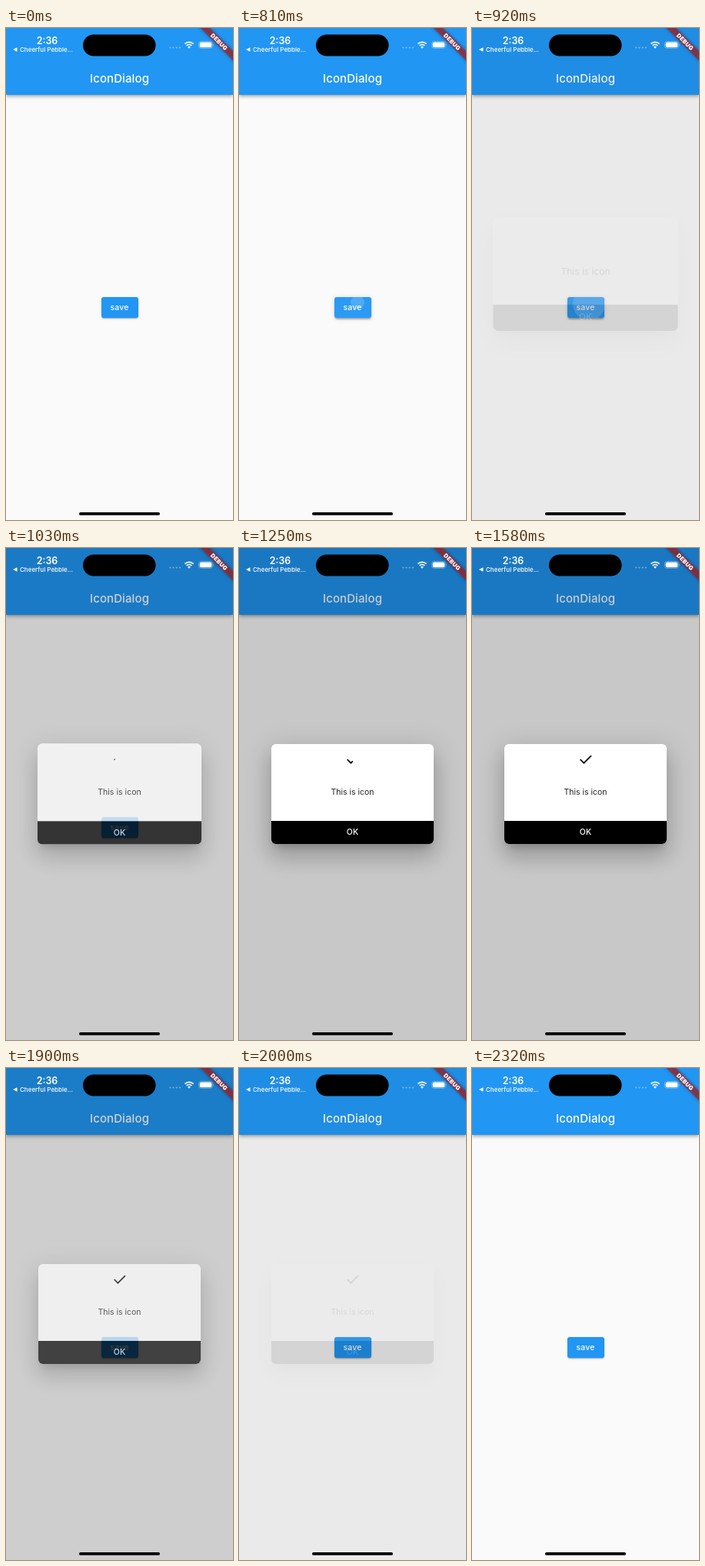
Write an HTML page that moves like this. It is 295x640 px and loops after 2.55 s.

```html
<!DOCTYPE html>
<html lang="en">
<head>
<meta charset="utf-8">
<title>IconDialog</title>
<style>
html, body { margin: 0; width: 100%; height: 100%; overflow: hidden; }
body { position: relative; background: #fafafa; font: 500 10.5px Inter, Roboto, sans-serif; }
body > *, .dialog > * { position: absolute; }
.bar, .save, .dialog { text-align: center; }
.bar {
  left: 0; top: 0; width: 295px; height: 86.5px; line-height: 131px;
  background: #2196f3; color: #fff; font-size: 15px; letter-spacing: .1px;
  box-shadow: 0 1.5px 3px -.7px #0003, 0 3px 3.7px #00000024, 0 .7px 7.5px #0000001f;
}
.save {
  left: 123.5px; top: 349.7px; width: 48px; height: 27px; line-height: 27px;
  border-radius: 3px; overflow: hidden; background: #2196f3; color: #fff; letter-spacing: .1px;
}
.ripple { position: absolute; border-radius: 50%; background: #fff; }
.barrier { inset: 0; background: #000; }
.dialog {
  left: 42px; top: 255px; width: 211px; height: 130px;
  border-radius: 6px; overflow: hidden; background: #fff;
  box-shadow: 0 8px 11px -5px #0003, 0 18px 28px 2px #00000024, 0 7px 34px 6px #0000001f;
}
.message { left: 0; top: 53px; width: 100%; line-height: 20px; font-weight: 400; color: #000000de; }
.ok { left: 0; top: 100px; width: 100%; height: 30px; line-height: 30px; background: #000; color: #fff; }
.check { left: 0; top: 0; }
.status { left: 0; top: 0; }
</style>
</head>
<body>
<div class="bar">IconDialog</div>
<div class="save" id="save"><i class="ripple" id="ripple"></i>save</div>
<div class="barrier" id="barrier"></div>
<div class="dialog" id="dialog">
  <svg class="check" width="211" height="50" fill="none" stroke="#000" stroke-width="1.7">
    <path id="check" pathLength="1" d="M98.7 20 L103.4 24.7 L113 15.1"/>
  </svg>
  <div class="message">This is icon</div>
  <div class="ok">OK</div>
</div>
<svg class="status" width="295" height="640" fill="#fff">
  <g transform="translate(295 0) rotate(45)">
    <rect x="-40" y="21" width="80" height="9" fill="#b71c1c" fill-opacity=".63"
      style="filter: drop-shadow(0 0 2px #0008)"/>
    <text y="28.2" text-anchor="middle" font-size="7.6" font-weight="900" letter-spacing=".2">DEBUG</text>
  </g>
  <text x="53.5" y="21" text-anchor="middle" font-size="12.5" font-weight="600">2:36</text>
  <path d="M9 28 L14.5 25.2 V30.8 Z"/>
  <text x="18" y="30.7" font-size="8">Cheerful Pebble...</text>
  <rect x="100" y="8.5" width="94.5" height="28" rx="14" fill="#000"/>
  <path d="M213.3 25.5 h13" stroke="#fff" stroke-opacity=".4" stroke-width="2.2"
    stroke-linecap="round" stroke-dasharray="0 4.2"/>
  <g fill="none" stroke="#fff" stroke-width="1.7">
    <path d="M232.4 20.7 a8 8 0 0 1 11.2 0 M234.6 23 a4.9 4.9 0 0 1 6.8 0"/>
  </g>
  <path d="M238 26.8 L236.1 24.8 a2.7 2.7 0 0 1 3.8 0 Z"/>
  <rect x="250.5" y="17.4" width="18" height="9" rx="2.8" fill="none" stroke="#fff" stroke-opacity=".4" stroke-width=".8"/>
  <rect x="251.7" y="18.6" width="15.6" height="6.6" rx="1.8"/>
  <path d="M269.4 20.4 q1.3 1.5 0 3 Z" fill-opacity=".5"/>
  <rect x="95" y="630" width="105" height="3.8" rx="1.9" fill="#000"/>
</svg>
<script>
const LOOP = 2550;
const STEPS = [0, 810, 920, 1030, 1140, 1250, 1360, 1470, 1580, 1900, 2000, 2320];
const style = id => document.getElementById(id).style;
const clamp = v => Math.min(1, Math.max(0, v));

// CSS-like cubic-bezier easing, solved by bisection
function bezier(x1, y1, x2, y2) {
  const at = (a, b, s) => 3 * a * s * (1 - s) ** 2 + 3 * b * s * s * (1 - s) + s ** 3;
  return x => {
    if (x <= 0 || x >= 1) return clamp(x);
    let lo = 0, hi = 1;
    for (let i = 0; i < 24; i++) {
      const mid = (lo + hi) / 2;
      if (at(x1, x2, mid) < x) lo = mid; else hi = mid;
    }
    return at(y1, y2, lo);
  };
}
const ease = bezier(.25, .1, .25, 1);
const easeInOut = bezier(.42, 0, .58, 1);
const settle = bezier(.35, .91, .33, .97);

function draw(t) {
  const open = clamp((t - 868) / 250);
  const shown = Math.min(open, clamp((2052 - t) / 250));
  style('barrier').opacity = .2 * ease(shown);
  style('dialog').opacity = easeInOut(shown);
  style('dialog').transform = `scale(${1.3 - .3 * settle(open)})`;
  style('check').strokeDasharray = `${clamp((t - 1000) / 500)} 2`;

  // Touch ripple grows while drifting to the button's centre
  const age = t - 810, pressed = age >= 0 && age < 220;
  const r = 9 + .11 * age, drift = clamp(age / 330);
  Object.assign(style('ripple'), {
    display: pressed ? 'block' : 'none',
    opacity: .17,
    width: 2 * r + 'px', height: 2 * r + 'px',
    left: 30.7 - 6.7 * drift - r + 'px',
    top: 7.5 + 6 * drift - r + 'px'
  });
  const lift = pressed ? 1.6 : 1;
  style('save').backgroundColor = pressed ? '#2b9af4' : '#2196f3';
  style('save').boxShadow =
    `0 ${1.7 * lift}px ${1.2 * lift}px -1px #0003, 0 ${1.3 * lift}px ${1.5 * lift}px #00000024, 0 .7px ${3.7 * lift}px #0000001f`;
}

const start = performance.now();
function tick() {
  const t = (performance.now() - start) % LOOP;
  draw(STEPS.filter(s => s <= t).pop());
  requestAnimationFrame(tick);
}
tick();
</script>
</body>
</html>
```
